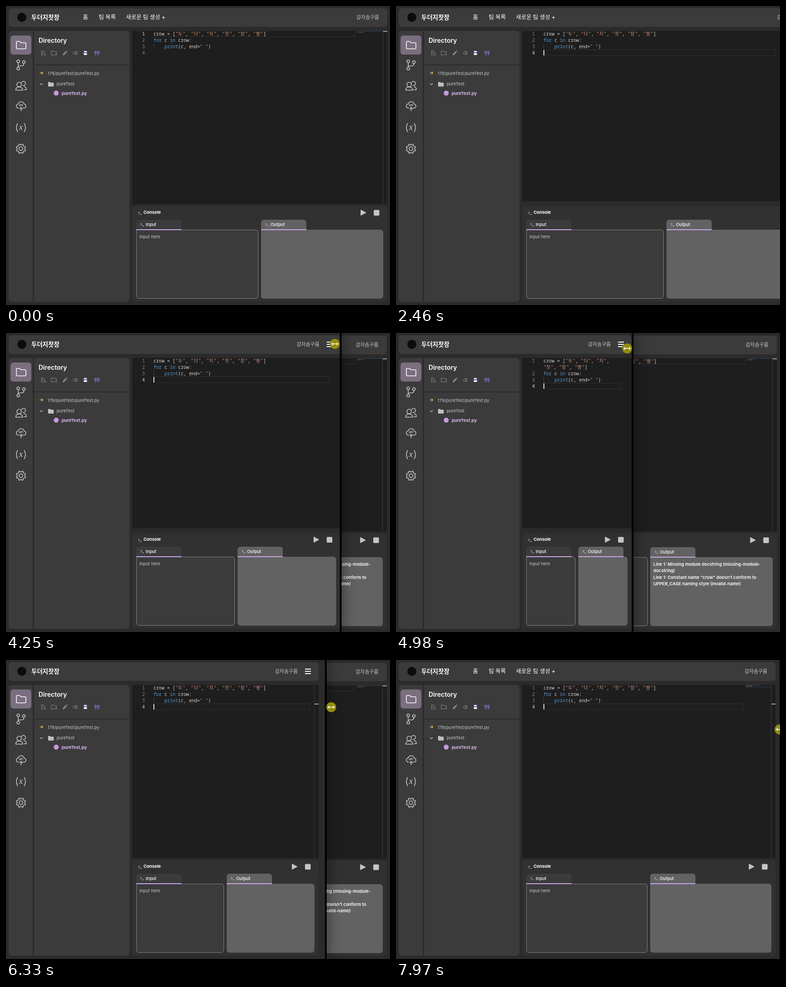
Recreate the animation shown at these times as an HTML page. Size 849 px wide and 659 px high, loop 8000 ms.

```html
<!DOCTYPE html>
<html lang="ko">
<head>
<meta charset="utf-8">
<title>Web IDE resize</title>
<style>
html, body { margin: 0; width: 100%; height: 100%; overflow: hidden; background: #2b2b2b; }
body { position: relative; font: 9.6px Inter, "Noto Sans CJK KR", "Noto Sans CJK", sans-serif; color: #fff; }
body div, body svg { position: absolute; }
#stage { width: 849px; height: 659px; overflow: hidden; }
#back { left: -1.5px; top: 1px; width: 849px; height: 659px; }
#front { top: 0; height: 659px; overflow: hidden; background: #2b2b2b; border-right: 4px solid #000; box-shadow: 0 0 30px #0007; }
.page { height: 659px; width: 849px; }
.panel { background: #3b3b3b; }
.t { line-height: 20px; white-space: nowrap; }
.head { left: 6px; right: 6px; top: 5px; height: 41px; border-radius: 7px; }
.nav { font-size: 12.5px; font-weight: 500; }
.user { right: 24px; top: 15px; font-size: 11px; color: #c8c8c8; }
.menu { right: 23px; top: 19px; width: 13px; height: 8px; border: solid #fff; border-width: 2px 0; display: none; }
.menu::after { content: ""; position: absolute; top: 3px; width: 13px; height: 2px; background: #fff; }
.narrow .nav, .narrow .mini, .lag .mini, .lag .ruler { display: none; }
.narrow .menu { display: block; }
.narrow .user { right: 52px; }
.editor { left: 279px; right: 6px; top: 55px; height: 382px; background: #1e1e1e; overflow: hidden; }
.lag .editor { height: 375px; }
.code { left: 47px; right: 71px; top: -1px; font: 10.08px/14px "Noto Sans Mono", "DejaVu Sans Mono", monospace; color: #d4d4d4; counter-reset: n; }
#back .code { margin-left: 3px; }
.narrow .code { right: 19px; }
.narrow.lag .code { right: 23px; }
.code p { position: relative; margin: 0; min-height: 14px; padding-right: 6px; white-space: pre-wrap; word-break: keep-all; }
.code p::before { counter-increment: n; content: counter(n); position: absolute; left: -39px; width: 20px; text-align: right; color: #858585; }
.code p.on::before { color: #d8d8d8; }
.code p.on::after { content: ""; position: absolute; inset: 0; border: 1px solid #303030; border-left: 0; }
.code .indent { padding-left: 24.2px; box-shadow: inset 1px 0 #404040; }
.code i { font-style: normal; color: #569cd6; }
.code u { text-decoration: none; color: #ce9178; }
.code u span { font: 10px/1 "Noto Sans CJK KR", "Noto Sans CJK", sans-serif; letter-spacing: 1px; }
.caret { left: 0; top: 0; width: 1.5px; height: 14px; background: #ddd; }
.ruler { right: 0; width: 9px; top: 0; bottom: 0; border-left: 1px solid #3c3c3c; }
.mark { left: 0; width: 10px; height: 1.5px; background: #a0a0a0; }
.mini { right: 10px; top: 0; width: 55px; height: 5px; }
.mini::before { content: ""; position: absolute; width: 30px; height: 1px; background: repeating-linear-gradient(90deg, #666 0 3px, #333 3px 5px); }
.mini::after { content: ""; position: absolute; top: 2px; width: 13px; height: 2px; background: repeating-linear-gradient(90deg, #4d5c68 0 2px, #2c2c2c 2px 4px); }
.slider { width: 55px; height: 1px; background: #29455c; }
.console { left: 279px; right: 6px; top: 441px; height: 210px; border-radius: 7px; background: #313131; }
.run { right: 20px; top: 446px; }
.pane { top: 471px; height: 174px; width: calc(50% - 154px); --fill: #3b3b3b; }
.output { right: 15px; --fill: #626262; }
.tab { width: 100px; max-width: 100%; height: 20.5px; border-radius: 6px 6px 0 0; border-bottom: 2px solid #cfa6e6; background: var(--fill); }
.box { inset: 22px 0 0; border-radius: 0 6px 6px 6px; background: var(--fill); border: 1px solid #858585; }
.output .box { border-color: var(--fill); }
.lint { left: 6px; top: 8px; font-weight: 600; line-height: 14.4px; white-space: nowrap; }
#pointer { width: 22px; height: 22px; margin: -11px; border-radius: 50%; background: #938c0e; }
#pointer svg { inset: 0; }
</style>
</head>
<body>
<div id="stage">
  <div id="back"></div>
  <div id="front"></div>
  <div id="pointer"><svg width="22" height="22" fill="none" stroke="#fff" stroke-width="1.3"><path/></svg></div>
</div>
<script>
const text = (x, y, str, css = "", cls = "") =>
  `<div class="t ${cls}" style="left:${x}px;top:${y - 10}px;${css}">${str}</div>`;
const prompt = (x, y) =>
  `<svg style="left:${x}px;top:${y}px" width="9" height="9" fill="none" stroke="#ddd"><path d="M.5 1.5l3 2.5-3 2.5M4.5 7.5h3.5"/></svg>`;

const gear = Array.from({ length: 32 }, (_, i) => {
  const r = (i + 1) % 4 < 2 ? 8.3 : 10.6, a = (i + .5) * Math.PI / 16;
  return [33 + r * Math.cos(a), 314.5 + r * Math.sin(a)].map(v => v.toFixed(1));
}).join(" ");

const icons = `
<svg width="278" height="659" fill="none" stroke="#c8c8c8" stroke-width="1.6" stroke-linejoin="round" stroke-linecap="round">
  <circle cx="35" cy="25" r="10" fill="#0c0c0c" stroke="none"/>
  <rect x="10" y="65" width="46" height="42" rx="6" fill="#7a6e7f" stroke="none"/>
  <path stroke="#fff" d="M23 92.5V80q0-2 2-2h5l3 3h9q2 0 2 2v9.5q0 2-2 2H25q-2 0-2-2z"/>
  <circle cx="27" cy="122" r="3"/><circle cx="27" cy="138" r="3"/><circle cx="39.5" cy="123.5" r="3"/>
  <path d="M27 125.5V134.5M39.5 127q0 5-5 5H32q-5 0-5 2"/>
  <circle cx="29" cy="173" r="5"/><path d="M21.5 185.5q0-7 7.5-7t8 7z"/>
  <path d="M34.5 169a4.5 4.5 0 1 1 3 6M40 177.5q5 1 5 7H40"/>
  <path d="M28 225h-1q-5-1-4-6 1-3 4-3 1-5 6.5-5t6.5 5q4 1 4 5t-5 4h-1M33.5 231v-7M30.5 226.5l3-3 3 3"/>
  <path d="M25.5 259q-5 9 0 18M40.5 259q5 9 0 18"/>
  <polygon points="${gear}"/><circle cx="33" cy="314.5" r="4"/>
  <g fill="#c8c8c8" stroke="none" text-anchor="middle">
    <text x="33" y="221" font-size="5.5" font-weight="700">API</text>
    <text x="33" y="273" font-size="17" font-style="italic" font-family="Noto Serif, serif">x</text>
  </g>
  <g stroke="#8a8a8a" stroke-width="1">
    <path d="M82 108.5h-3.5v-10h4l3 3v2M80.5 102.5h3M80.5 105h2M86 105v4M84 107h4"/>
    <path d="M107 108h-7v-9h4l1 1.5h6.5v4M110.5 105v4M108.5 107h4"/>
    <path fill="#8a8a8a" stroke="none" d="M125 109l1-3.5 6-6 2.5 2.5-6 6zM133 98.5l1-1 2.5 2.5-1 1z"/>
    <path d="M148.5 103.5l2.5-3h6v6h-6zM152.5 102l3 3M155.5 102l-3 3"/>
  </g>
  <g stroke="none">
    <rect x="171" y="99" width="9" height="9" rx="1" fill="#5b5a9c"/>
    <path fill="#fff" d="M173 99h5v3h-5zM172.5 104h6v4h-6z"/>
    <path fill="#70609c" d="M195.5 99h5v6l-2 4h-2l1-4h-2zM201.5 99h5v6l-2 4h-2l1-4h-2z"/>
    <path fill="#c0c0c0" d="M93 168.5q0-1 1-1h3.5l1.5 1.5h5.5q1 0 1 1v6.5q0 1-1 1H94q-1 0-1-1z"/>
    <circle cx="111" cy="192" r="5.5" fill="#c59add"/>
  </g>
  <path stroke="#e0b05c" d="M75.5 147.5h6M79 145l2.5 2.5-2.5 2.5"/>
  <path stroke-width="1.2" d="M75.5 171l2.7 2.7 2.7-2.7"/>
</svg>`;

const letters = [..."두더지찻장짱"].map(c => `<u>"<span>${c}</span>"</u>`).join(", ");

const page = lint => `
<div class="page">
  <div class="panel head"></div>
  <div class="panel" style="left:6px;top:55px;width:53px;height:597px;border-radius:7px 0 0 7px"></div>
  <div class="panel" style="left:61.5px;top:55px;width:211.5px;height:73.5px;border-radius:0 7px 0 0"></div>
  <div class="panel" style="left:61.5px;top:130.5px;width:211.5px;height:521.5px;border-radius:0 0 7px 0"></div>
  ${icons}
  ${text(56, 25, "두더지찻장", "font-size:13.5px;font-weight:700")}
  ${text(170, 25, "홈", "", "nav")}
  ${text(205, 25, "팀 목록", "", "nav")}
  ${text(265, 25, "새로운 팀 생성 +", "", "nav")}
  <div class="t user">감자솜구름</div><div class="menu"></div>
  ${text(72, 76, "Directory", "font-size:14px;font-weight:600")}
  ${text(92, 149, "179/pureTest/pureTest.py", "color:#c8c8c8")}
  ${text(112, 172, "pureTest", "color:#c8c8c8")}
  ${text(123, 192.5, "pureTest.py", "color:#dcb8f0;font-weight:700")}
  <div class="editor">
    <div class="code">
      <p class="on">crow = [${letters}]</p>
      <p><i>for</i> c <i>in</i> crow:</p>
      <p class="indent"><i>print</i>(c, end=<u>" "</u>)</p>
      <p></p>
    </div>
    <div class="mini"><div class="slider"></div></div>
    <div class="ruler"><div class="mark"></div></div>
  </div>
  <div class="console"></div>
  ${prompt(292, 452)}${text(304, 455, "Console", "font-weight:700")}
  <svg class="run" width="50" height="20" fill="#c4c4c4"><path d="M5.5 3.5v12l11.5-6z" stroke="#c4c4c4" stroke-linejoin="round"/><rect x="34" y="3.5" width="12.5" height="12.5" rx="2"/></svg>
  <div class="pane" style="left:287.5px">
    <div class="box"></div><div class="tab">${prompt(9.5, 6)}${text(21.5, 10.5, "Input", "font-weight:500")}</div>
    ${text(7.5, 38, "Input here", "color:#c8c8c8")}
  </div>
  <div class="pane output">
    <div class="box">${lint ? `<div class="lint">Line 1: Missing module docstring (missing-module-<br>docstring)<br>Line 1: Constant name "crow" doesn't conform to<br>UPPER_CASE naming style (invalid-name)</div>` : ""}</div>
    <div class="tab">${prompt(9.5, 6)}${text(21.5, 10.5, "Output", "font-weight:500")}</div>
  </div>
</div>`;

const $ = s => document.querySelector(s);
const front = $("#front"), pointer = $("#pointer");
$("#back").innerHTML = page(true);
front.innerHTML = page(false);
const view = $("#front .page"), lines = [...front.querySelectorAll(".code p")];
const mark = $("#front .mark"), slider = $("#front .slider");
const caret = document.createElement("div");
caret.className = "caret";
lines[3].append(caret);

// time, page width, window edge, pointer x, pointer y
const keys = [
  [0, 849, 860, 900, 366], [85, 849, 860, 900, 366], [86, 849, 860, 832, 366],
  [360, 849, 860, 520, 290], [600, 849, 860, 520, 290], [812, 849, 860, 830, 100],
  [890, 849, 860, 900, 90], [2000, 849, 860, 900, 90], [2080, 855, 866, 900, 90],
  [2810, 980, 986, 1000, 90], [3439, 1166, 1172, 1180, 30], [3610, 1168, 1170, 1170, 20],
  [3700, 1130, 1122, 1110, 20], [4000, 850, 842, 832, 22], [4440, 668, 662, 650, 26],
  [4979, 527, 521, 511.5, 34], [5340, 430, 425, 422, 46], [5700, 424, 426, 432, 53],
  [5885, 449, 455, 474, 59], [6066, 583, 593, 607, 80], [6500, 765, 772, 785, 118],
  [6972, 815, 817, 823.5, 148], [7250, 804, 806, 812, 150], [7770, 832, 835, 840, 152],
  [7969, 845, 848, 848, 153], [8100, 849, 852, 852, 153]
];

function sample(t) {
  const i = keys.findIndex(k => k[0] > t), a = keys[i - 1], b = keys[i];
  const f = (t - a[0]) / (b[0] - a[0]);
  return a.map((v, n) => v + (b[n] - v) * f);
}

const STEP = 90.6, START = 2080;
const hold = t => Math.max(0, START + STEP * Math.floor((t - START) / STEP + .28));

function render(now) {
  const t = hold(now % 8000);
  const [, width, edge, x, y] = sample(t);
  const w = Math.round(width);
  view.style.width = w + "px";
  front.style.width = Math.round(edge) + "px";
  view.classList.toggle("narrow", w < 768);
  view.classList.toggle("lag", t >= START && t < 5300);

  const active = t >= 440 ? 3 : 0;
  lines.forEach((p, i) => p.classList.toggle("on", i === active));
  mark.style.top = Math.max(0, lines[active].offsetTop - 1) + "px";
  slider.style.top = active ? "4px" : "0";
  const shown = t >= 440 && t < 895 || t >= 1440 && t < 1895 || t >= 2400;
  caret.style.display = shown ? "" : "none";

  pointer.style.left = x + "px";
  pointer.style.top = y + "px";
  pointer.querySelector("path").setAttribute("d", t < START
    ? "M8.5 5.5h5M11 5.5v11M8.5 16.5h5"
    : "M4 11h14M7 8l-3 3 3 3M15 8l3 3-3 3");
}

function tick() {
  render(performance.now());
  requestAnimationFrame(tick);
}
tick();
</script>
</body>
</html>
```
